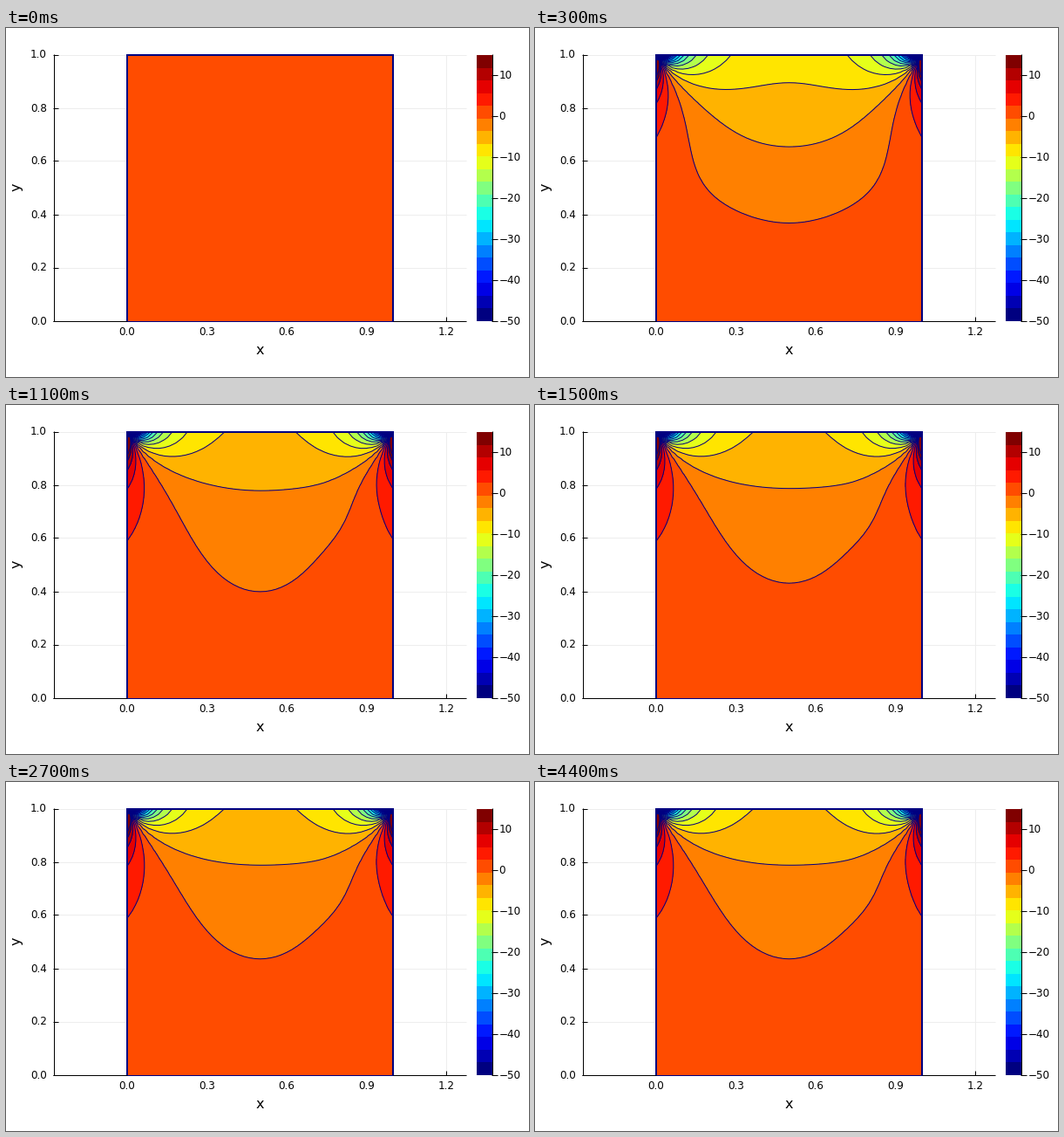
These frames come from a looping animation (600x400 px, 6 s). A matplotlib script:

```python
import numpy as np
import matplotlib.pyplot as plt
from matplotlib.animation import FuncAnimation
from matplotlib.patches import Rectangle

PT = 0.72  # points per pixel at 100 dpi
LEFT, RIGHT, TOP, BOTTOM = 139, 444, 31, 336
SIDE = RIGHT - LEFT
NAVY = (0, 0, 0.5)
CELLS = 21
LEVELS = np.linspace(-50, 15, CELLS + 1)
LAST_CHANGE = 44

plt.rcParams["font.family"] = "DejaVu Sans"
fig = plt.figure(figsize=(6, 4), dpi=100, facecolor="white")
ax = fig.add_axes([0, 0, 1, 1])
ax.set_xlim(0, 600)
ax.set_ylim(400, 0)
ax.axis("off")


def jet(v):
    return tuple(np.clip([min(4 * v - 1.5, 4.5 - 4 * v),
                          min(4 * v - 0.5, 3.5 - 4 * v),
                          min(4 * v + 0.5, 2.5 - 4 * v)], 0, 1))


COLORS = [jet(k / (CELLS - 1)) for k in range(CELLS)]


def line(x0, y0, x1, y1, color="black", width=1, z=1):
    ax.plot([x0, x1], [y0, y1], color=color, lw=width * PT, zorder=z,
            solid_capstyle="butt")


def label(x, y, text, size=12, **kw):
    ax.text(x, y, text, fontsize=size * PT, va="center", **kw)


def draw_axes():
    for v in np.arange(0, 1.01, 0.2):
        y = BOTTOM - SIDE * v - 0.5
        line(55, y, 528, y, "#ededed", z=0)
        line(54, y, 60, y)
        label(47, y + 0.5, f"{v:.1f}", ha="right")
    for v in np.arange(0, 1.21, 0.3):
        x = LEFT + SIDE * v - 0.5
        line(x, TOP, x, BOTTOM, "#ededed", z=0)
        line(x, 331, x, BOTTOM)
        label(x + 0.2, 348, f"{v:.1f}", ha="center")
    line(54.5, TOP - 1, 54.5, BOTTOM)
    line(54, BOTTOM - 0.5, 528, BOTTOM - 0.5)
    label(291.5, 369, "x", 16, ha="center")
    label(12, 182.5, "y", 16, ha="center", rotation=90)


def draw_color_bar():
    cell = SIDE / CELLS
    for k, color in enumerate(COLORS):
        ax.add_patch(Rectangle((540, BOTTOM - cell * (k + 1)), 18, cell,
                               fc=color, ec="none"))
    line(557.5, TOP - 1, 557.5, BOTTOM)
    for v in range(-50, 11, 10):
        y = BOTTOM - SIDE * (v + 50) / 65 - 0.5
        line(557, y, 564, y)
        label(565.5, y + 0.5, str(v).replace("-", "\u2212"), ha="left")


def draw_cavity():
    ax.add_patch(Rectangle((LEFT, TOP), SIDE, SIDE, fc=COLORS[16], ec="none", zorder=2))
    for x in (LEFT, RIGHT):
        line(x, TOP - 1, x, BOTTOM, NAVY, 2, 9)
    line(LEFT, TOP, RIGHT, TOP, NAVY, 2, 9)
    line(LEFT, BOTTOM - 0.5, RIGHT, BOTTOM - 0.5, NAVY, 1, 9)


draw_axes()
draw_color_bar()
draw_cavity()

# Unit cavity: x to the right, d down from the moving lid
x, d = np.meshgrid(np.linspace(0, 1, 51), np.linspace(0, 1, 51))
arch = np.sin(np.pi * x)
near_wall = 1 - 0.35 * (np.exp(-x / 0.1) + np.exp(-(1 - x) / 0.1))


def corner(x):
    """Vorticity beside a corner where the sliding lid meets a wall at rest."""
    x = np.maximum(x, 1e-3 * (d == 0))
    return (1.363 * d - 2.141 * x) / np.maximum(x ** 2 + d ** 2, 1e-6)


STEADY = corner(x) + corner(1 - x) + 2.6 * near_wall * np.exp(-3.2 * d ** 1.35)
DRIFT = 0.4 * np.exp(-((x - 0.82) ** 2 + (d - 0.3) ** 2) / 0.02)


def vorticity(n):
    """Steady flow plus a fading layer below the lid and a passing core swirl."""
    reach = (0.52 + 0.12 * (1 - arch)) * np.sqrt(n / 3)
    layer = 1.75 * np.exp(-0.6 * (n - 3)) * near_wall * np.exp(-(d / reach) ** 4)
    core = 0.78 * np.exp(-(np.log(n / 6) / 0.483) ** 2) * arch * np.sin(np.pi * d)
    drift = DRIFT * (1 - np.exp(-(n / 5) ** 4))
    return np.clip(STEADY - layer - core - drift, -110, 70)


contours = []


def draw(frame):
    while contours:
        contours.pop().remove()
    if frame > 0:
        grid = LEFT + SIDE * x, TOP + SIDE * d, vorticity(min(frame, LAST_CHANGE))
        contours.append(ax.contourf(*grid, LEVELS, extend="both", zorder=3,
                                    colors=[COLORS[0], *COLORS, COLORS[-1]]))
        contours.append(ax.contour(*grid, LEVELS, colors=[NAVY], linewidths=PT,
                                   linestyles="solid", zorder=4))
    return contours


anim = FuncAnimation(fig, draw, frames=60, interval=100, init_func=lambda: draw(0),
                     repeat=True, repeat_delay=0, blit=False)
plt.show()
```
